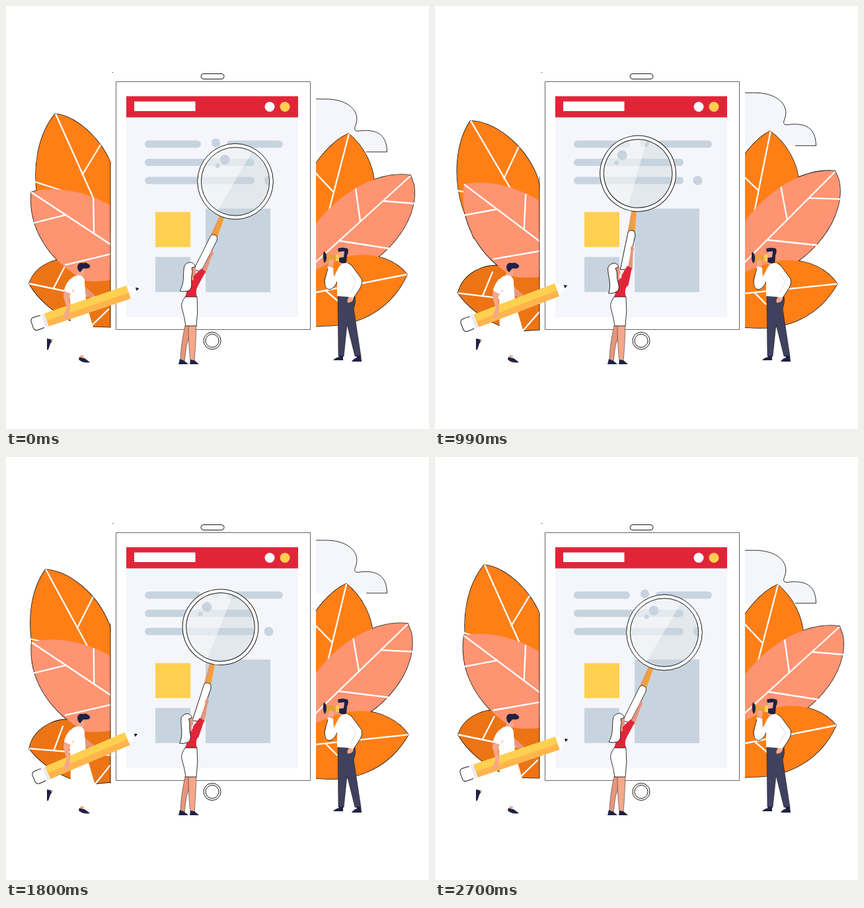
These frames come from a looping animation (640x640 px, 2730 ms). An HTML page with a canvas:

```html
<!DOCTYPE html>
<html lang="en">
<head>
<meta charset="utf-8">
<title>Search illustration</title>
<style>
html, body { margin: 0; height: 100%; overflow: hidden; background: #fff; }
canvas { display: block; }
</style>
</head>
<body>
<canvas id="stage" width="640" height="640"></canvas>
<script>
const ctx = document.getElementById('stage').getContext('2d');
const LOOP = 2730, STEP = 30;
const INK = '#1a1a1a', NAVY = '#1f2145', RED = '#e12539', PALE = '#f5f6fb', GREY = '#c7d4df';
const YELLOW = '#ffd04f', AMBER = '#ffb54d', ORANGE = '#ff7f16', RUST = '#ec7415', PINK = '#ff9472';
const SKIN = '#f5a78a', TAN = '#e8957a';

// Pose times shared by all keyed motions
const TIMES = [0, 420, 660, 1320, 1800, 2340, 2700];

// Smooth curve through one value per pose time
function keyed(t, values) {
  const last = TIMES.length - 1;
  if (t >= TIMES[last]) return values[last];
  const i = TIMES.findIndex(x => x > t) - 1;
  const slope = k => {
    const a = Math.max(k - 1, 0), b = Math.min(k + 1, last);
    return (values[b] - values[a]) / (TIMES[b] - TIMES[a]);
  };
  const h = TIMES[i + 1] - TIMES[i], u = (t - TIMES[i]) / h, w = 1 - u;
  return w * w * (1 + 2 * u) * values[i] + u * u * (3 - 2 * u) * values[i + 1]
    + h * u * w * (w * slope(i) - u * slope(i + 1));
}
const wave = (t, start, period) => (1 - Math.cos(2 * Math.PI * (t - start) / period)) / 2;

function shape(d, fill, stroke, width = 0.9) {
  const path = new Path2D(d);
  if (fill) { ctx.fillStyle = fill; ctx.fill(path); }
  if (stroke) { ctx.strokeStyle = stroke; ctx.lineWidth = width; ctx.stroke(path); }
}
function circle(x, y, r, fill, stroke, width = 1) {
  ctx.beginPath();
  ctx.arc(x, y, r, 0, 7);
  if (fill) { ctx.fillStyle = fill; ctx.fill(); }
  if (stroke) { ctx.strokeStyle = stroke; ctx.lineWidth = width; ctx.stroke(); }
}
function rect(x, y, w, h, fill, radius = 0, stroke) {
  ctx.beginPath();
  ctx.roundRect(x, y, w, h, radius);
  if (fill) { ctx.fillStyle = fill; ctx.fill(); }
  if (stroke) { ctx.strokeStyle = stroke; ctx.lineWidth = 1; ctx.stroke(); }
}
function turned(degrees, x, y, draw) {
  ctx.save();
  ctx.translate(x, y);
  ctx.rotate(degrees * Math.PI / 180);
  ctx.translate(-x, -y);
  draw();
  ctx.restore();
}
function clipped(x, w, draw) {
  ctx.save();
  ctx.beginPath();
  ctx.rect(x, 0, w, 640);
  ctx.clip();
  draw();
  ctx.restore();
}

const leftLeaves = [
  { fill: ORANGE, pivot: [161, 359], angle: t => -keyed(t, [0, 3.9, 6, 6, 4.4, 1.7, 0]),
    outline: 'M74.5 163C48 195 40 245 48 290L60 340H180L165 255C150 205 110 168 74.5 163Z',
    veins: 'M75 163L135 297M143 210L115 256M44 266L84 279' },
  { fill: RUST, pivot: [207, 430], angle: t => -keyed(t, [0, 2, 3.3, 6, 7, 1.7, 0]),
    outline: 'M35 420C45 390 80 378 105 385L170 400V486L131 485C100 484 55 455 35 420Z',
    veins: 'M35 420L170 448M90 392L72 427M156 458L127 486' },
  { fill: PINK, pivot: [227, 368], angle: t => 4.4 * wave(t, -70, 1690),
    outline: 'M38 282C65 273 115 276 162 304L175 330V414L158 415Q130 418 120 416C75 392 33 345 38 282Z',
    veins: 'M38 282L160 362M132 290L133 344M40 329L91 316M89 392L160 375' }
];
const rightLeaves = [
  { fill: ORANGE, pivot: [448, 391], angle: t => -keyed(t, [0, 2.9, 4, 2.2, 1.1, 0, 0]),
    outline: 'M518.5 193C545 215 555 245 557 264L530 330L450 360V270C470 230 495 203 518.5 193Z',
    veins: 'M519 193L488 312M465 249L495 281' },
  { fill: PINK, pivot: [476, 390], angle: t => -keyed(t, [0, 0.9, 2, 3.1, 1.8, 0.4, 0]),
    outline: 'M612 256C570 250 515 272 469 329L450 350V420L500 410C570 395 627 325 617 270Z',
    veins: 'M612 257L455 400M529 276L536 326M571 295L619 299M503 355L580 367' },
  { fill: ORANGE, pivot: [450, 432], angle: t => keyed(t, [0, 1.8, 3.7, 6.2, 5.1, 1.5, 0]),
    outline: 'M607 406C590 385 560 374 530 377C505 380 485 390 450 410V486L480 484C540 484 585 455 607 406Z',
    veins: 'M607 406L455 436M484 431L503 447' }
];

function drawLeaves(leaves, t) {
  const each = draw => leaves.forEach(leaf => turned(leaf.angle(t), ...leaf.pivot, () => draw(leaf)));
  each(leaf => shape(leaf.outline, null, INK, 1.6));
  each(leaf => {
    shape(leaf.outline, leaf.fill);
    shape(leaf.veins, null, '#fff', 2.3);
  });
}

function drawCloud(t) {
  ctx.save();
  ctx.translate(0, -21.2 * wave(t, -82, 1418));
  const top = 'M460 141.5H485C518 142 537 160 529 181Q525 190 532 190C560 186 576 194 576.5 221.5';
  shape(top + 'H460Z', PALE);
  shape(top + 'H545', null, INK);
  ctx.restore();
}

function drawTablet() {
  rect(161, 100, 1, 1, INK);
  rect(295, 102.5, 35, 8, '#fff', 4, INK);
  rect(166.5, 114.5, 294, 375, '#fff', 0, '#666');
  rect(182, 136.5, 260, 334.5, PALE);
  rect(182, 136.5, 260, 32, RED);
  rect(194, 144.6, 92.5, 14.4, '#fff');
  circle(399, 152.5, 7.5, '#fff');
  circle(422, 152.5, 7.5, YELLOW);
  [[210, 203.5, 85], [334, 203.5, 85], [210, 231, 166], [210, 258.5, 166]]
    .forEach(([x, y, w]) => rect(x, y, w, 11, GREY, 5.5));
  circle(317.5, 207, 6.7, GREY);
  circle(397.5, 264, 7, GREY);
  rect(226, 311.7, 53, 53, YELLOW);
  rect(226, 379.7, 53, 53, GREY);
  rect(302, 306.5, 98, 126.5, GREY);
  circle(312, 506.5, 13, '#fff', INK);
  circle(312, 506.5, 10, '#fff', INK);
}

function drawMagnifier() {
  shape('M323 318L330 321L319 352L309 348Z', '#f5a033');
  shape('M323 318L326 319L313 350L309 348Z', '#e59a62');
  shape('M309 349Q312 343 319 348Q320 351 319 355L295 402L284 399Z', '#fff', INK);
  ctx.save();
  ctx.beginPath();
  ctx.arc(347, 265.5, 52, 0, 7);
  ctx.clip();
  rect(290, 208, 115, 115, 'rgba(200,212,218,.42)');
  shape('M375 216L317 315L280 320V200H375Z', 'rgba(255,255,255,.5)');
  ctx.restore();
  circle(331, 232.5, 7.5, GREY);
  circle(320, 241.5, 3.5, GREY);
  circle(347, 265.5, 54.5, null, '#fff', 5.5);
  circle(347, 265.5, 57.3, null, INK);
  circle(347, 265.5, 51.7, null, INK);
}

function drawWoman(swing) {
  shape('M271 483L283 484Q277 500 273 514L270 537H264Q264 515 271 483Z', TAN, INK, 0.5);
  shape('M276 483H288Q287 515 285 537H279Q276 515 276 483Z', SKIN, INK, 0.5);
  shape('M263 534L270 537L276 542H261Z', NAVY);
  shape('M279 535L285 536L292 542H278Z', NAVY);
  turned(swing, 281, 413, drawMagnifier);
  turned(swing * 1.15, 281, 413, () => {
    shape('M296 401L308 377Q308 370 313 370Q315 375 311 379L302 405Z', TAN);
    shape('M284 408L296 397L302 402L289 426L277 428Z', RED);
  });
  shape('M277 413L288 410L290 424Q286 432 289 440H271Q275 430 274 420Z', RED);
  shape('M271 440H289Q291 462 288 484H272Q270 470 266 457Q264 450 271 440Z', '#fff', INK);
  turned(swing * 0.8, 281, 435, () => {
    shape('M279 394L287 395L287 405L284 408V415H278Z', TAN);
    shape('M270 393Q274 387 281 388Q286 390 286 395L281 396Q283 402 281 408C279 414 284 427 276 431Q269 433 263 431C271 418 267 405 270 393Z', '#fff', INK);
  });
}

function drawPencil() {
  ctx.save();
  ctx.translate(61.5, 475);
  ctx.rotate(-18.7 * Math.PI / 180);
  rect(-23, -10, 18, 20, '#fff', 5, INK);
  rect(-7, -10.3, 7, 20.6, '#e9ebf2');
  rect(-7, -10.3, 2, 20.6, '#fff');
  rect(0, -10.3, 131, 20.6, AMBER);
  rect(0, -10.3, 131, 11, YELLOW);
  shape('M131 -10.3L148 -0.7L131 10.3Z', '#fff');
  shape('M143 -3.3L148 -0.7L143 2Z', INK);
  ctx.restore();
}

function drawWriter(t) {
  shape('M97 438H118L135 497H98Z', '#fff');
  shape('M62 503L71 505L67 511L64 520H62Z', NAVY);
  shape('M67 503L71 505L69 508Z', SKIN);
  shape('M111 531L119 533L127 539Q117 541 110 535Z', NAVY);
  shape('M113 528L118 529L117 533L112 531Z', SKIN);
  shape('M117 420L122 427L134 437L130 443L117 436Z', TAN);
  shape('M110 399L118 400L119 406L115 409L112 413L106 409Z', SKIN);
  shape('M97 414Q104 406 114 408Q120 412 119 420L121 445H97L94 432Z', '#fff');
  shape('M108 394Q110 387 117 389Q121 387 124 390Q128 392 127 395Q125 398 117 397L112 403Q108 400 108 394Z', NAVY);
  turned(-keyed(t, [0, 0, 0, 4.4, 4.4, 1, 0]), 97, 453, drawPencil);
  shape('M95 417Q87 428 87 440L92 458Q86 468 89 473Q95 474 96 467L97 455L95 440L103 430Z', SKIN);
  shape('M97 413Q89 422 88 431L99 436L105 420Z', '#fff');
}

function drawLookout(lean) {
  shape('M502 439H528Q530 448 526 458L537 530H528L516 482L511 530H503Z', '#3f415f', INK, 0.6);
  shape('M504 529H510L510 536H495Q498 532 504 531Z', NAVY);
  shape('M530 529H537L538 538H523Q526 533 531 532Z', NAVY);
  turned(-lean, 515, 420, () => {
    shape('M504 370H513V388L507 394L503 386Z', SKIN);
    shape('M502 367Q509 364 517 367Q519 372 516 377L515 388Q509 391 504 387L503 381L511 380L512 371L503 372Z', NAVY);
    shape('M482 373L490 376L504 377V385L490 386L482 388Z', '#e9a13b');
    shape('M499 376H504V386H499Z', YELLOW);
    shape('M481 371Q485 374 485 380Q485 386 482 389Q478 380 481 371Z', NAVY);
    shape('M489 384Q495 382 496 388L494 397H487Z', SKIN);
  });
  shape('M487 394L495 396L496 410L503 396Q508 388 516 389Q523 391 527 398L538 413Q540 420 535 428L525 443L517 440L501 439L501 417Q497 428 489 429Q482 428 482 419Z', '#fff');
  shape('M518 389Q523 391 527 398L538 413Q540 420 535 428L525 443M487 397L482 415Q482 429 490 429Q497 427 501 417', null, INK);
  shape('M522 405L530 417L521 434', null, '#cfd2dc', 0.8);
  shape('M519 440L526 442Q525 449 517 449Q515 446 519 440Z', SKIN);
}

function draw(t) {
  ctx.fillStyle = '#fff';
  ctx.fillRect(0, 0, 640, 640);
  clipped(0, 158.5, () => {
    drawLeaves(leftLeaves, t);
    const top = 237 - 3.4 * leftLeaves[0].angle(t), bottom = 485 - 1.3 * leftLeaves[1].angle(t);
    shape(`M158 ${top}V${bottom}`, null, INK, 1);
  });
  clipped(469, 171, () => {
    drawCloud(t);
    drawLeaves(rightLeaves, t);
  });
  drawTablet();
  drawWriter(t);
  drawWoman(-keyed(t, [0, 7.8, 12.6, 15.1, 8.5, 0, 0]));
  drawLookout(keyed(t, [0, 8.5, 3.5, 0, 0, 0, 0]));
}

function tick(now) {
  draw(Math.floor(now % LOOP / STEP) * STEP);
  requestAnimationFrame(tick);
}
requestAnimationFrame(tick);
</script>
</body>
</html>
```
